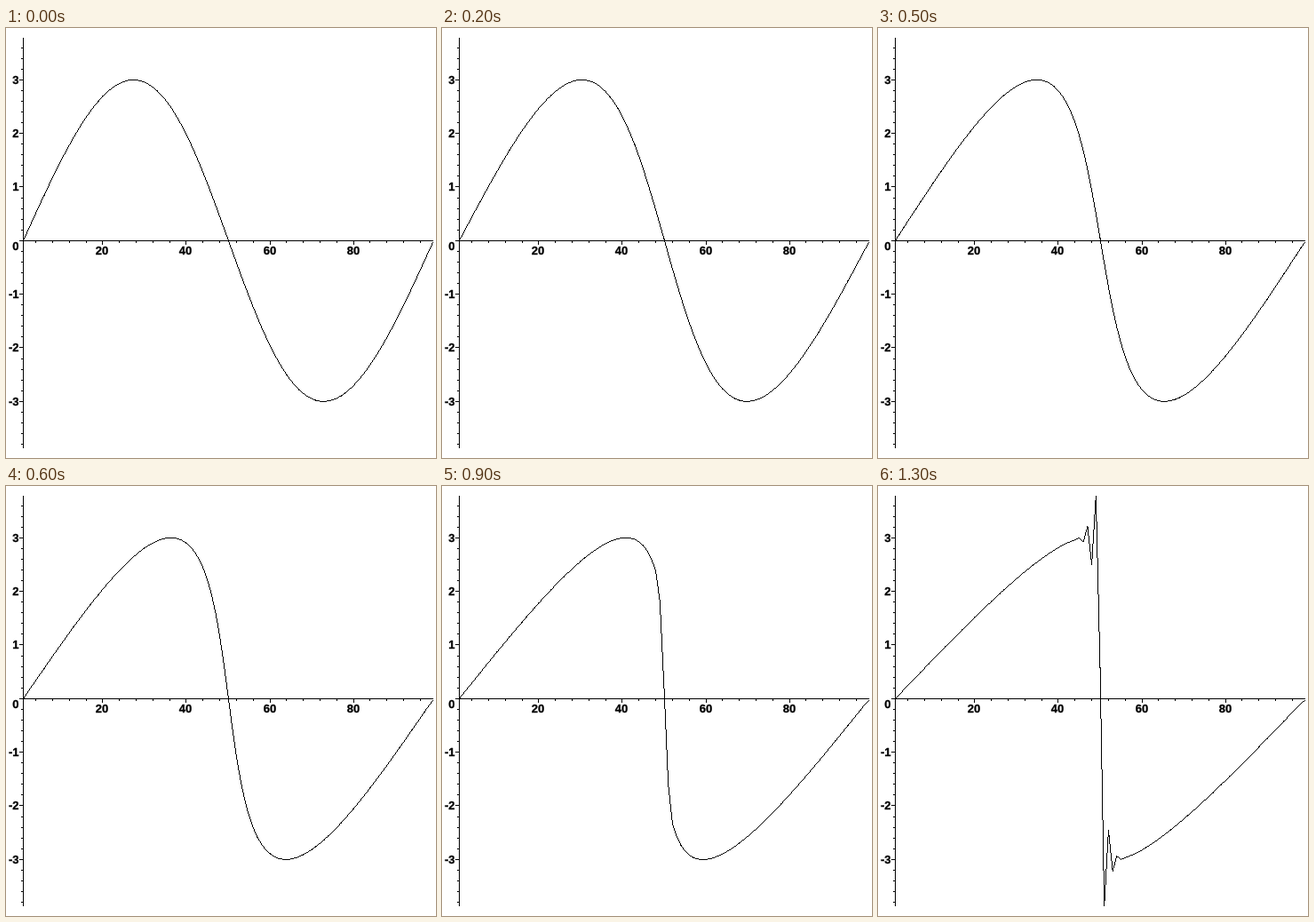
An HTML page with a canvas for the animation above (1400 ms loop, 484 by 484 pixels).

```html
<!DOCTYPE html>
<html lang="en">
<head>
<meta charset="utf-8">
<title>Wave steepening</title>
<style>
html, body { margin: 0; width: 100%; height: 100%; overflow: hidden; background: #fff; }
canvas { display: block; }
</style>
</head>
<body>
<canvas id="stage" width="484" height="484"></canvas>
<script>
const ctx = document.getElementById('stage').getContext('2d');
const FRAMES = 14, FRAME_MS = 100, FIRST = 6, STRIDE = 5;
const N = 99, LAMBDA = 0.1;
const LEFT = 19, RIGHT = 480, TOP = 11, BOTTOM = 472;
const ZERO = 238.82, UNIT = 60.33;

const px = x => LEFT + (x - 1) * (RIGHT - LEFT) / (N - 1);
const py = y => ZERO - y * UNIT;

// One Lax-Wendroff step of u_t + (u^2 / 2)_x = 0 with fixed ends.
function advance(u) {
  const flux = v => v * v / 2;
  const cell = i => {
    const a = u[i], b = u[i + 1];
    return (flux(a) + flux(b)) / 2 - LAMBDA / 2 * (a + b) / 2 * (flux(b) - flux(a));
  };
  return u.map((v, i) => i === 0 || i === N - 1 ? v : v - LAMBDA * (cell(i) - cell(i - 1)));
}

function solve() {
  let u = Array.from({ length: N }, (_, i) => 3 * Math.sin(0.064 * i));
  const waves = [];
  for (let step = 1; waves.length < FRAMES; step++) {
    u = advance(u);
    if (step >= FIRST && (step - FIRST) % STRIDE === 0) waves.push(u);
  }
  return waves;
}

function dot(x, y) {
  if (y >= TOP && y <= BOTTOM) ctx.fillRect(x, y, 1, 1);
}

// Crisp one-pixel line that keeps the fractional ends.
function line(x0, y0, x1, y1) {
  const dx = x1 - x0, dy = y1 - y0;
  const steep = Math.abs(dy) > Math.abs(dx);
  const [from, to] = steep ? [y0, y1] : [x0, x1];
  const first = Math.round(Math.min(from, to)), last = Math.round(Math.max(from, to));
  for (let p = first; p <= last; p++) {
    const t = from === to ? 0 : Math.min(1, Math.max(0, (p - from) / (to - from)));
    if (steep) dot(Math.round(x0 + dx * t), p);
    else dot(p, Math.round(y0 + dy * t));
  }
}

function label(text, x, y, align) {
  ctx.textAlign = align;
  ctx.fillText(text, x, y);
  ctx.strokeText(text, x, y);
}

function drawAxes() {
  const base = Math.round(ZERO);
  line(LEFT, TOP, LEFT, BOTTOM);
  line(LEFT, base, RIGHT, base);
  ctx.font = 'bold 13px "Liberation Sans", Arial, sans-serif';
  ctx.lineWidth = 0.3;

  for (let i = -19; i <= 18; i++) {
    const y = Math.round(py(i / 5)), major = i % 5 === 0;
    line(LEFT - (major ? 4 : 2), y, LEFT, y);
    if (major && i) label(i / 5, 14.5, y + 5, 'right');
  }
  label(0, 14.5, 250, 'right');

  for (let v = 4; v < N; v += 4) {
    const x = Math.round(px(v)), major = v % 20 === 0;
    line(x, base, x, base + (major ? 4 : 2));
    if (major) label(v, x, 255, 'center');
  }
}

function drawWave(u) {
  for (let i = 1; i < N; i++) line(px(i), py(u[i - 1]), px(i + 1), py(u[i]));
}

const waves = solve();
let start = null;

function render(now) {
  if (start === null) start = now;
  const k = Math.floor((now - start) / FRAME_MS) % FRAMES;
  ctx.fillStyle = '#fff';
  ctx.fillRect(0, 0, 484, 484);
  ctx.fillStyle = ctx.strokeStyle = '#000';
  drawAxes();
  drawWave(waves[k]);
  requestAnimationFrame(render);
}
requestAnimationFrame(render);
</script>
</body>
</html>
```
